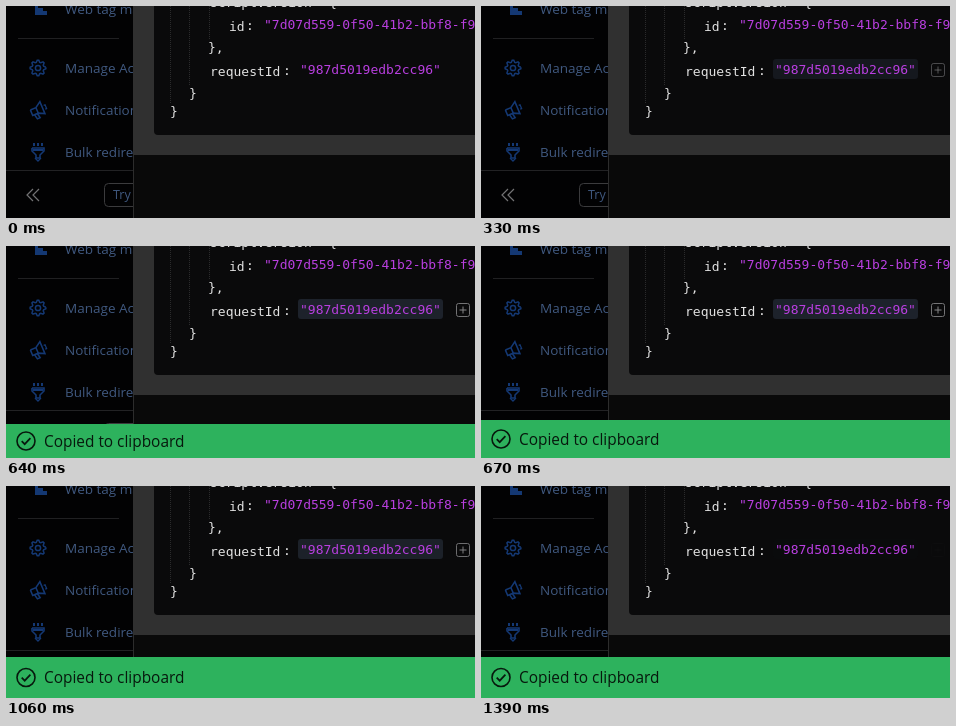
Write an HTML page with a canvas that moves like this. It is 469 px wide and 212 px high and loops after 3090 ms.

```html
<!DOCTYPE html>
<html lang="en">
<head>
<meta charset="utf-8">
<title>Copy request id</title>
<style>
html, body { margin: 0; width: 100%; height: 100%; overflow: hidden; background: #020203; }
canvas { display: block; width: 469px; height: 212px; }
</style>
</head>
<body>
<canvas id="stage"></canvas>
<script>
const W = 469, H = 212, LOOP = 3090, STEP = 30;
const SANS = '"Open Sans", "Noto Sans", sans-serif';
const MONO = '13px "DejaVu Sans Mono", monospace';
const BLUE = '#143873', LINK = '#405980', CODE = '#e2e2e2', STRING = '#b93fe0';

const canvas = document.getElementById('stage');
const ctx = canvas.getContext('2d');
const scale = window.devicePixelRatio || 1;
canvas.width = W * scale;
canvas.height = H * scale;

const clamp = v => Math.max(0, Math.min(1, v));

function rect(x, y, w, h, color) {
  ctx.fillStyle = color;
  ctx.fillRect(x, y, w, h);
}

function text(str, x, y, color, font) {
  ctx.font = font;
  ctx.fillStyle = color;
  ctx.fillText(str, x, y);
}

function line(points, color, width = 1) {
  ctx.beginPath();
  points.forEach(([x, y], i) => i ? ctx.lineTo(x, y) : ctx.moveTo(x, y));
  ctx.strokeStyle = color;
  ctx.lineWidth = width;
  ctx.stroke();
}

function round(x, y, w, h, r) {
  ctx.beginPath();
  ctx.roundRect(x, y, w, h, r);
}

function ring(x, y, r, color, width) {
  ctx.beginPath();
  ctx.arc(x, y, r, 0, Math.PI * 2);
  ctx.strokeStyle = color;
  ctx.lineWidth = width;
  ctx.stroke();
}

function gear(cx, cy) {
  const points = [];
  for (let i = 0; i <= 32; i++) {
    const a = (i - 0.5) * Math.PI / 16;
    const r = i % 4 < 2 ? 7.9 : 5.9;
    points.push([cx + r * Math.cos(a), cy + r * Math.sin(a)]);
  }
  line(points, BLUE, 1.5);
  ring(cx, cy, 2.6, BLUE, 1.5);
}

function megaphone(cx, cy) {
  ctx.save();
  ctx.translate(cx, cy);
  ctx.rotate(-0.4);
  line([[-7, -3], [-1, -3], [5, -7], [5, 6], [-1, 3], [-7, 3], [-7, -3]], BLUE, 1.6);
  line([[-1, -3], [-1, 3]], BLUE, 1.5);
  line([[-5, 3], [-4, 8], [-1, 8], [-2, 3]], BLUE, 1.5);
  line([[7, -2], [8.5, -2], [8.5, 2], [7, 2]], BLUE, 1.3);
  ctx.restore();
}

function funnel(cx, cy) {
  for (const x of [-4, 0, 4]) rect(cx + x - 1, cy - 9, 2, 3, BLUE);
  line([[cx - 6, cy - 4], [cx + 6, cy - 4], [cx + 6, cy - 1], [cx + 2, cy + 3],
    [cx + 2, cy + 6], [cx - 2, cy + 6], [cx - 2, cy + 3], [cx - 6, cy - 1], [cx - 6, cy - 4]], BLUE, 1.6);
  rect(cx - 5, cy - 3, 10, 2, BLUE);
  line([[cx - 3, cy + 6], [cx, cy + 9], [cx + 3, cy + 6]], BLUE, 1.4);
}

function sidebar() {
  rect(0, 0, 127, H, '#020203');
  ctx.save();
  ctx.beginPath();
  ctx.rect(0, 0, 127, H);
  ctx.clip();
  rect(29, 0, 3, 9, BLUE);
  rect(32, 2, 5, 7, BLUE);
  rect(37, 5, 4, 4, BLUE);
  rect(12, 32, 101, 1, '#202022');
  gear(32, 62);
  megaphone(32, 104);
  funnel(32, 146);
  [['Web tag management', 8], ['Manage Account', 67], ['Notifications', 109], ['Bulk redirects', 151]]
    .forEach(([label, y]) => text(label, 59, y, LINK, '13.5px ' + SANS));
  rect(0, 164, 127, 1, '#222224');
  for (const x of [27, 33]) line([[x, 183], [x - 6, 189], [x, 195]], '#737375', 1.2);
  round(98.5, 177.5, 50, 23, 4);
  ctx.strokeStyle = '#3b3b3d';
  ctx.lineWidth = 1;
  ctx.stroke();
  text('Try', 107, 193, LINK, '12.5px ' + SANS);
  ctx.restore();
}

function hover(amount) {
  if (!amount) return;
  ctx.globalAlpha = amount;
  round(292, 53, 145, 20, 3);
  ctx.fillStyle = '#1d222b';
  ctx.fill();
  round(450.5, 57.5, 13, 13, 2);
  ctx.strokeStyle = '#737375';
  ctx.lineWidth = 1;
  ctx.stroke();
  line([[453.5, 64], [460.5, 64]], '#858587');
  line([[457, 60.5], [457, 67.5]], '#858587');
  ctx.globalAlpha = 1;
}

function panel(hoverAmount) {
  rect(127, 0, W - 127, 149, '#303030');
  rect(127, 149, W - 127, H - 149, '#090909');
  rect(127, 149, 1, H - 149, '#2c2c2c');
  round(148, -10, W, 139, 4);
  ctx.fillStyle = '#0a0a0b';
  ctx.fill();

  ctx.setLineDash([1, 1]);
  for (const [x, end] of [[164.5, 97], [183.5, 79], [203.5, 34]])
    line([[x, 0], [x, end]], '#2b2b2c');
  ctx.setLineDash([]);

  hover(hoverAmount);
  const code = (str, x, y, color = CODE) => text(str, x, y, color, MONO);
  code('scriptVersion', 204, 1);
  code(':', 308, 0);
  code('{', 323, 1);
  code('id', 223, 25);
  code(':', 240, 24);
  code('"7d07d559-0f50-41b2-bbf8-f9', 258, 23, STRING);
  code('},', 202, 46);
  code('requestId', 204, 70);
  code(':', 277, 69);
  code('"987d5019edb2cc96"', 294, 68, STRING);
  code('}', 183, 92);
  code('}', 164, 110);
}

function banner(height) {
  const top = H - height, mid = top + height / 2;
  rect(0, top, W, height, '#2db25d');
  ring(20, mid, 9, '#07180d', 1.6);
  line([[15.7, mid + 0.2], [18.7, mid + 3.2], [24.4, mid - 2.8]], '#07180d', 1.7);
  text('Copied to clipboard', 38, mid + 5.5, '#07180d', '15.4px ' + SANS);
}

function draw(t) {
  const tick = Math.floor(t / STEP) * STEP;
  const fadeIn = tick < 120 ? 0 : clamp((tick - 90) / 390);
  const fadeOut = clamp((tick - 1030) / 360);
  ctx.setTransform(scale, 0, 0, scale, 0, 0);
  sidebar();
  panel(fadeIn * (1 - fadeOut));
  if (t >= 640) {
    const p = clamp((t - 640) / 120);
    banner(34 + Math.round(7 * (1 - (1 - p) ** 3)));
  }
}

function frame() {
  draw(performance.now() % LOOP);
  requestAnimationFrame(frame);
}
frame();
</script>
</body>
</html>
```
